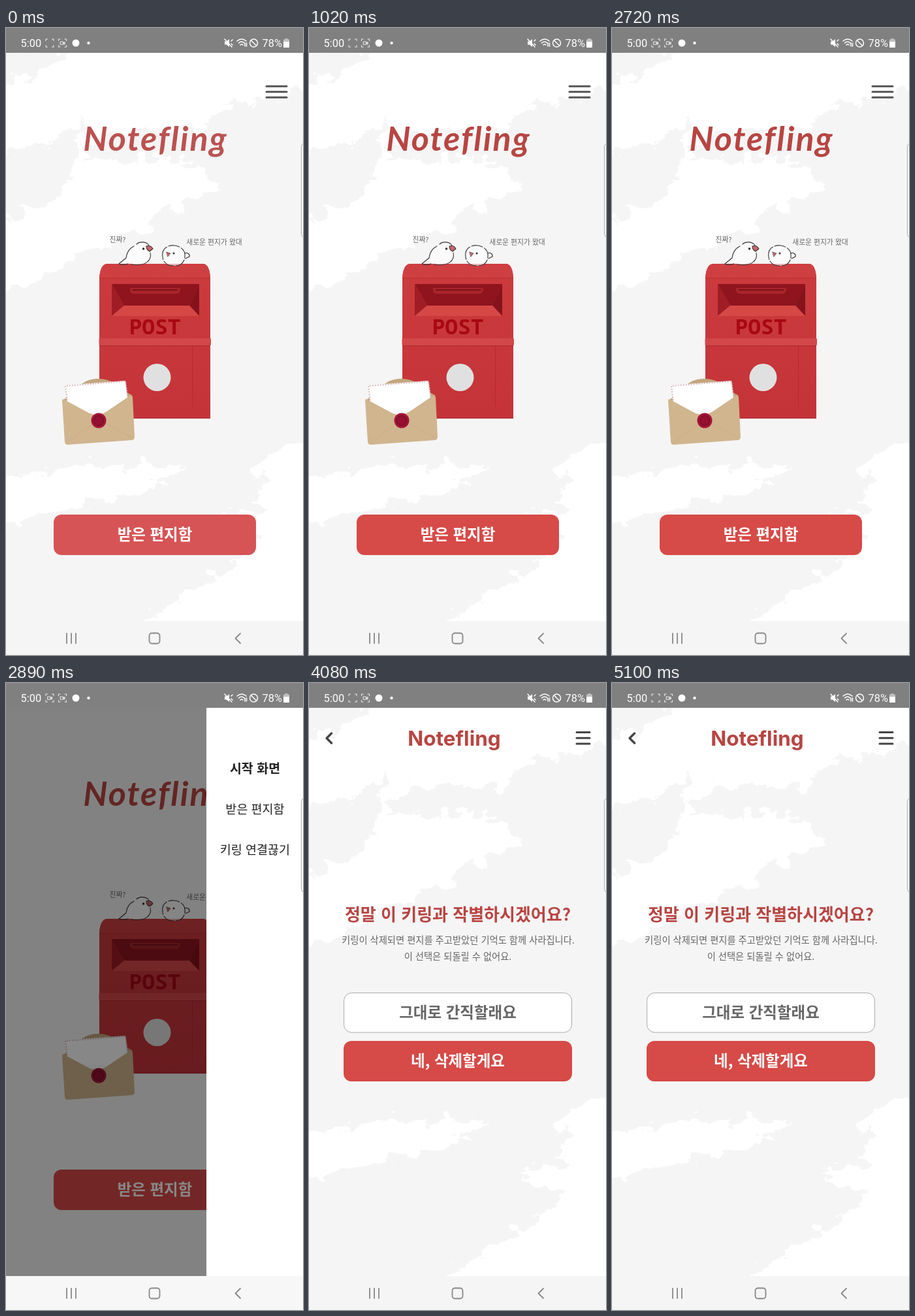
An HTML page that plays this animation: 455 px wide and 960 px high, repeating every 5.44 s.

```html
<!DOCTYPE html>
<html lang="ko">
<head>
<meta charset="utf-8">
<title>Notefling</title>
<style>
html, body { margin: 0; height: 100%; overflow: hidden; background: #f5f5f5; }
svg { display: block; width: 100vw; height: 100vh; }
text { font-family: "Noto Sans CJK KR", "Noto Sans CJK", sans-serif; text-anchor: middle; }
.line { fill: none; stroke-linecap: round; stroke-linejoin: round; }
.bold { font-weight: 700; }
.status text { font-family: Roboto, sans-serif; font-size: 16.4px; text-anchor: start; }
.note { font-size: 10.8px; font-weight: 300; fill: #666; }
</style>
</head>
<body>
<svg viewBox="0 0 455 960" preserveAspectRatio="none">
  <defs>
    <filter id="rough" x="0" y="0" width="455" height="960" filterUnits="userSpaceOnUse">
      <feTurbulence type="fractalNoise" baseFrequency=".035 .05" numOctaves="4" seed="7"/>
      <feDisplacementMap in="SourceGraphic" scale="46" xChannelSelector="R" yChannelSelector="G"/>
    </filter>
    <linearGradient id="paper" x2="0" y2="1">
      <stop offset=".6" stop-color="#fff"/><stop offset="1" stop-color="#e6e6e6"/>
    </linearGradient>
    <linearGradient id="body" x2="0" y2="1">
      <stop stop-color="#cb3b3e"/><stop offset="1" stop-color="#c43338"/>
    </linearGradient>
    <path id="corners" class="line" stroke="#e8e8e8" stroke-width="1.1"
      d="M0 2.500V0H2.500M9.500 0H12V2.500M12 9.500V12H9.500M2.500 12H0V9.500"/>
    <path id="camera" class="line" stroke="#e8e8e8" stroke-width="1.1" d="M2.700 4H7V8.300H2.700ZM7.300 6L9.500 4.500V8Z"/>
  </defs>

  <rect width="455" height="960" fill="#f5f5f5"/>
  <g id="brush" fill="#fff" filter="url(#rough)">
    <path d="M-30 100L60 60 120 20H490V85L400 112 330 125 270 168 200 150 150 165 112 185 130 202 215 200 290 207 325 235
      270 275 225 290 170 320 130 345 70 375-30 415V300L60 270 100 235 108 185 120 140 60 175-30 205Z"/>
    <path d="M-30 765V705L60 677 130 665 180 667 285 672 240 695 200 715 130 725 60 748Z"/>
    <path d="M490 600L400 655 370 685 400 682 385 710 400 735 330 745 345 775 385 770 380 800 300 850 200 920H490Z"/>
  </g>
  <rect y="908" width="455" height="52" fill="#f5f5f5"/>

  <g id="home">
    <path class="line" stroke="#555" stroke-width="3" d="M399 89.200H430M399 97.800H430M399 106.200H430"/>
    <text id="logo" x="229" y="188" style="font:italic 700 52px Lato,sans-serif;letter-spacing:2px">Notefling</text>

    <text class="note" x="171" y="328">진짜?</text>
    <text class="note" x="319" y="332">새로운 편지가 왔대</text>

    <path d="M143 383C144 368 148 361 156 361H302Q312 362 313 383V598H143Z" fill="url(#body)"/>
    <path d="M143 383C144 368 148 361 156 361H302Q312 362 313 383Z" fill="#ce3f42"/>
    <path d="M143 383H313" stroke="#b52e33"/>
    <path d="M162 392H296L281 425H181Z" fill="#8f141e"/>
    <path d="M162 392L181 425 162 441Z" fill="#a01d25"/>
    <path d="M296 392L281 425 296 441Z" fill="#84131b"/>
    <path d="M181 425H281L296 441H162Z" fill="#d64846"/>
    <path d="M190 398H267V401Q266 407 260 407H197Q190 407 190 401Z" fill="#a8252b"/>
    <path d="M194 401H263" stroke="#7a0f18" stroke-width="2"/>
    <text x="228" y="469" fill="#a80812" style="font:700 33px 'Noto Sans Mono',monospace">POST</text>
    <rect x="142.500" y="475" width="171.500" height="11" rx="1.500" fill="#d2474a"/>
    <path d="M143 486.500H313" stroke="#ae2a30"/>
    <path d="M285.500 487V580M143 597.500H313" stroke="#b12c32"/>
    <circle cx="231.500" cy="535" r="21" fill="#e0e0e0"/>

    <g class="line" stroke="#333" stroke-width="1.100">
      <path stroke="none" fill="#fff" fill-opacity=".6" d="M199 332C204 326 215 326 220 334 226 350 220 362 203 362 192 363 184 360 184 352 184 344 192 338 199 332Z"/>
      <path d="M200 331C204 327 215 326 219 333M196 334C190 337 185 343 184 352L173 361Q179 364 187 361M192 362C211 365 224 358 221 344"/>
      <path fill="#c9656a" d="M215 334Q222 332 225 338L220 342Q215 340 215 334Z"/>
      <circle cx="210.500" cy="338" r="1.200" fill="#333"/>
      <path fill="#fff" fill-opacity=".6" stroke-dasharray="17 3" d="M240 350C238 338 248 332 258 333 268 334 275 341 274 349 274 360 266 365 256 364 247 364 240 358 240 350Z"/>
      <path d="M274 345C277 343 282 346 281 350L275 353"/>
      <path fill="#c9656a" stroke-width=".6" d="M246 343L252 345 248 350Z"/>
      <circle cx="257" cy="345" r="1" fill="#333"/>
    </g>

    <path d="M87 570C108 556 114 538 139 537 165 536 172 552 193 562L160 600H112Z" fill="#c2a67e"/>
    <path d="M90 547L183 540 189 590 141 608 96 592Z" fill="url(#paper)"/>
    <path d="M95 582L91 548 183 541 187 568" fill="none" stroke="#d9b8bc" stroke-width="2" stroke-dasharray="2 2"/>
    <path d="M86 570Q86 567 89 569L128 590Q141 595 153 588L190 563Q193 561 194 565L197 626Q197 630 193 631L95 638Q91 638 90 634Z" fill="#d0b58e"/>
    <path d="M91 637L136 604M196 629L149 603" stroke="#c9ad85" stroke-width=".8"/>
    <circle cx="142" cy="601" r="11.500" fill="#a41439"/>
    <circle cx="142" cy="601" r="7.500" fill="#96102f" stroke="#781029" stroke-width="1.500"/>

    <rect id="inbox" x="73" y="745" width="310" height="62" rx="12"/>
    <text class="bold" x="228" y="784" font-size="23.500" fill="#fff">받은 편지함</text>
  </g>

  <g id="menu">
    <rect y="38" width="455" height="870" fill="#000" opacity=".47"/>
    <rect x="307" y="38" width="148" height="870" fill="#fff"/>
    <rect y="908" width="455" height="52" fill="#f7f7f7"/>
    <g fill="#222" font-size="18.500">
      <text class="bold" x="381.500" y="138" font-size="19.500">시작 화면</text>
      <text x="381.500" y="200">받은 편지함</text>
      <text x="381.500" y="262">키링 연결끊기</text>
    </g>
  </g>

  <g id="confirm">
    <path class="line" stroke="#444" stroke-width="3.400" d="M34.500 77L27 84.500 34.500 92"/>
    <path class="line" stroke="#444" stroke-width="3" d="M410 75.500H430M410 84.300H430M410 93H430"/>
    <text x="222.500" y="96" fill="#b84542" style="font:700 31.500px Inter,sans-serif">Notefling</text>
    <text class="bold" x="228" y="364" font-size="26" fill="#b84542">정말 이 키링과 작별하시겠어요?</text>
    <g font-size="14.300" fill="#666">
      <text x="228.500" y="399">키링이 삭제되면 편지를 주고받았던 기억도 함께 사라집니다.</text>
      <text x="228" y="424">이 선택은 되돌릴 수 없어요.</text>
    </g>
    <rect x="53.500" y="474.500" width="349" height="60.500" rx="12" fill="#fff" stroke="#aaa"/>
    <rect x="53" y="548" width="350" height="62" rx="12" fill="#d64a47"/>
    <g class="bold" font-size="23.500">
      <text x="228" y="512.500" fill="#666">그대로 간직할래요</text>
      <text x="228" y="587" fill="#fff">네, 삭제할게요</text>
    </g>
  </g>

  <rect x="452.500" y="176.500" width="12" height="144" rx="5" fill="#fafafa" stroke="#aaa"/>

  <g class="status" fill="#fff">
    <rect width="455" height="38" fill="#808080"/>
    <text x="22.500" y="29">5:00</text>
    <use href="#corners" x="61" y="17"/>
    <use id="blink" href="#camera" x="61" y="17"/>
    <use href="#corners" x="80.500" y="17"/>
    <use href="#camera" x="80.500" y="17"/>
    <circle cx="107" cy="23" r="5.500"/>
    <circle cx="126.500" cy="23" r="2.200"/>
    <path d="M335 20.500H338L342 17V29L338 25.500H335Z"/>
    <g class="line" stroke="#fff" stroke-width="1.500">
      <path d="M335 17L346 29M345 20L347 18M345 24L347 26"/>
      <path d="M354 20Q361 14 368 20M356.500 23Q361 19 365 23M359 26Q361 24 363 26M366 23V28M368.500 23V28"/>
      <circle cx="379.500" cy="23" r="6"/>
      <path d="M375.500 19L383.500 27"/>
    </g>
    <text x="392.500" y="29">78%</text>
    <path d="M427.500 16H431.500V17.500H434V30H425V17.500H427.500Z" opacity=".5"/>
    <path d="M425 21H434V28.500Q434 30 432.500 30H426.500Q425 30 425 28.500Z"/>
  </g>

  <g class="line" stroke="#888" stroke-width="1.800">
    <path d="M93 927V942M100 927V942M107 927V942"/>
    <rect x="219.500" y="926.500" width="16" height="16" rx="4"/>
    <path d="M359 927L351.500 934.500 359 942"/>
  </g>
</svg>
<script>
const LOOP = 5440, PRESS_END = 170, MENU = 2890, CONFIRM = 4080, BLINK = 510;
const get = id => document.getElementById(id);
const show = (id, on) => get(id).style.display = on ? "" : "none";

function draw(now) {
  const t = now % LOOP;
  const confirming = t >= CONFIRM;
  const menuOpen = t >= MENU && !confirming;
  const pressed = t < PRESS_END;
  show("home", !confirming);
  show("confirm", confirming);
  show("menu", menuOpen);
  show("brush", !menuOpen);
  show("blink", Math.floor(t / BLINK) % 2 === 1);
  get("inbox").setAttribute("fill", pressed ? "#d65455" : "#d64a47");
  get("logo").setAttribute("fill", pressed ? "#bb5250" : "#b84542");
}

const start = performance.now();
function tick() {
  draw(performance.now() - start);
  requestAnimationFrame(tick);
}
tick();
</script>
</body>
</html>
```
